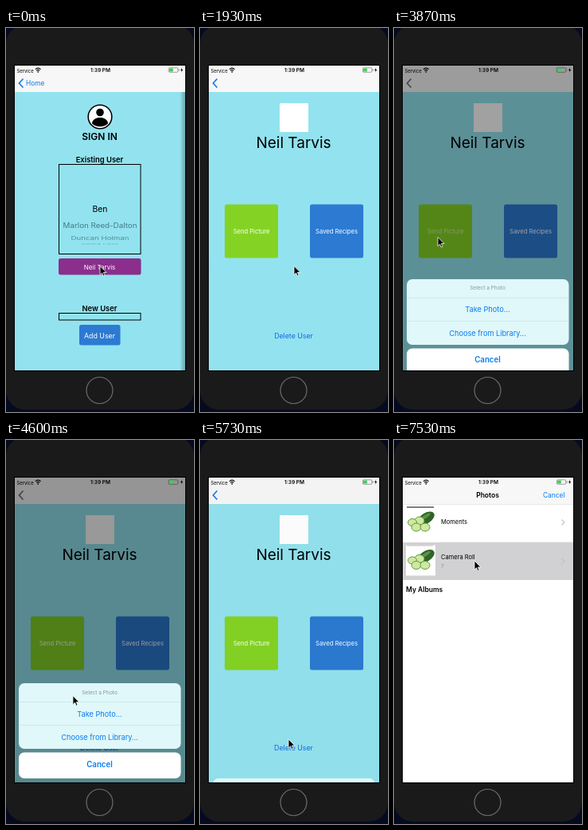
An HTML page that plays this animation: 236x480 px, repeating every 8000 ms.

```html
<!DOCTYPE html>
<html lang="en">
<head>
<meta charset="utf-8">
<title>Phone app demo</title>
<style>
  html, body { margin: 0; width: 100%; height: 100%; overflow: hidden; background: #060a20; }
  svg { display: block; width: 236px; height: 480px; }
  text { font: 400 8.4px Inter, "Liberation Sans", sans-serif; text-anchor: middle; dominant-baseline: central; }
  .left { text-anchor: start; }
  .bold { font-weight: 600; }
  .white { fill: #fff; }
  .link { fill: #087bf0; }
  .title { font-size: 19px; }
  .label { font-size: 7.6px; }
  .row { font-size: 7.5px; }
  .action { font-size: 9.2px; }
  .line { fill: none; stroke: #000; }
</style>
</head>
<body>
<svg viewBox="0 0 236 480">
  <defs>
    <clipPath id="screen"><rect x="11" y="47" width="214" height="381"/></clipPath>
    <linearGradient id="shade"><stop offset="0" stop-opacity="0"/><stop offset="1" stop-opacity=".28"/></linearGradient>
    <g id="veg">
      <rect width="37" height="38" fill="#fff"/>
      <ellipse cx="25" cy="14" rx="12" ry="6.5" fill="#2f6426" transform="rotate(-32 25 14)"/>
      <ellipse cx="24" cy="12" rx="8" ry="2" fill="#5c9148" transform="rotate(-32 24 12)"/>
      <g fill="#cfe8a2" stroke="#5f9c38">
        <ellipse cx="17" cy="17" rx="6" ry="5"/>
        <ellipse cx="8" cy="19" rx="5.5" ry="4.5"/>
        <ellipse cx="13" cy="25" rx="6" ry="5"/>
        <ellipse cx="24" cy="25" rx="6" ry="5"/>
      </g>
    </g>
    <path id="next" d="M210.500-3.500l3.500 3.500l-3.500 3.500" fill="none" stroke="#c2c2c6" stroke-width="1.100"/>
  </defs>

  <rect y="-4" width="236" height="481" rx="24" fill="#1a1a1a"/>
  <rect x="10.500" y="46.500" width="215" height="382" class="line"/>
  <circle cx="117.500" cy="453" r="16.500" fill="none" stroke="#6c6c6c" stroke-width="1.200"/>

  <g clip-path="url(#screen)">
    <g id="signIn">
      <rect x="11" y="80" width="214" height="348" fill="#92e3ef"/>
      <circle cx="118" cy="111" r="14.800" fill="#fff" stroke="#000" stroke-width="1.600"/>
      <circle cx="118" cy="105.500" r="4.800"/>
      <path d="M108 119.500c0-10 20-10 20 0c-5 5-15 5-20 0z"/>
      <text x="117.500" y="135" class="bold" style="font-size:12px">SIGN IN</text>
      <text x="117.500" y="164" class="bold" style="font-size:9.400px">Existing User</text>
      <rect x="66.500" y="170.500" width="102.500" height="112" class="line"/>
      <text x="118" y="226.500" style="font-size:10.400px">Ben</text>
      <g fill="#38707a" style="font-size:9.800px">
        <text transform="translate(118 246.500) scale(1 .88)" style="font-size:9.800px" opacity=".9">Marlon Reed-Dalton</text>
        <text transform="translate(118 262.500) scale(1 .6)" style="font-size:9.700px" opacity=".75">Duncan Holman</text>
        <text transform="translate(118 270.500) scale(1 .25)" style="font-size:9.400px" opacity=".4">Petra Lind</text>
      </g>
      <rect x="66" y="288" width="103.500" height="20.500" rx="2.500" fill="#8b2e8c"/>
      <text id="userTitle" x="117.500" y="298.500" class="white" style="font-size:8px">Neil Tarvis</text>
      <text x="117.500" y="350" class="bold" style="font-size:9.400px">New User</text>
      <rect x="66.500" y="356.500" width="102.500" height="8.500" class="line"/>
      <rect x="92" y="371" width="51.500" height="25.500" rx="2.500" fill="#2c7ad2"/>
      <text x="117.500" y="384" class="white" style="font-size:8.800px">Add User</text>
    </g>
    <rect id="under" x="11" y="80" width="214" height="348"/>

    <g id="home">
      <rect x="4" y="80" width="7" height="348" fill="url(#shade)"/>
      <rect x="11" y="80" width="214" height="348" fill="#92e3ef"/>
      <rect x="100" y="94" width="36" height="36" fill="#fff"/>
      <text x="117.500" y="143.500" class="title">Neil Tarvis</text>
      <rect x="31" y="220.500" width="67" height="67" rx="2.500" fill="#84d324"/>
      <text id="sendTitle" x="64.500" y="254" class="white label">Send Picture</text>
      <rect x="138" y="220.500" width="67" height="67" rx="2.500" fill="#2c7ad2"/>
      <text x="171.500" y="254" class="white label">Saved Recipes</text>
      <text x="117.500" y="384.500" fill="#1569e0" style="font-size:8.800px">Delete User</text>
    </g>

    <rect x="11" y="47" width="214" height="33" fill="#f7f7f7"/>
    <path id="back" d="M21.500 63.500l-5 5.500l5 5.500" fill="none" stroke="#167df0" stroke-width="1.700"/>
    <text id="backText" x="25" y="69" class="left link">Home</text>

    <rect id="dim" x="11" y="47" width="214" height="381"/>

    <g id="sheet">
      <rect x="16" y="304" width="203.500" height="82" rx="7" fill="#e0f8fa"/>
      <rect id="picked" x="16" y="356.500" width="203.500" height="29.500" rx="5" fill="#c4dfe3"/>
      <path d="M16 327.500h203.500M16 356.500h203.500" stroke="#bfdfe3" stroke-width=".6"/>
      <text x="117.500" y="315.500" fill="#87959a" style="font-size:6.550px">Select a Photo</text>
      <text x="117.500" y="342" class="link action">Take Photo…</text>
      <text x="117.500" y="371.500" class="link action">Choose from Library…</text>
      <rect x="16" y="390.500" width="203.500" height="32.500" rx="7" fill="#fff"/>
      <text x="117.500" y="405" class="link bold" style="font-size:9.700px">Cancel</text>
    </g>

    <g id="photos">
      <rect x="11" y="47" width="214" height="381" fill="#fff"/>
      <rect x="11" y="47" width="214" height="33" fill="#f7f7f7"/>
      <path d="M11 80.500h214" stroke="#d8d8da" stroke-width=".6"/>
      <text x="117.500" y="69" class="bold" style="font-size:8.500px">Photos</text>
      <text id="cancel" x="200.700" y="69" class="link">Cancel</text>
      <use href="#veg" x="15" y="84"/>
      <path d="M16 84h34" stroke="#55555c" stroke-width="1.500"/>
      <text x="59" y="102.500" class="left row">Moments</text>
      <use href="#next" y="103"/>
      <path d="M59 127.500h166" stroke="#e2e2e4" stroke-width=".6"/>
      <rect id="pressed" x="11" y="128" width="214" height="47" fill="#d1d0d2"/>
      <use href="#veg" x="15" y="131.500"/>
      <path d="M16 132h33" stroke="#aaa" stroke-width=".7"/>
      <text x="59" y="146.500" class="left row">Camera Roll</text>
      <text x="59" y="157.500" class="left" fill="#8d8d90" style="font-size:6.500px">7</text>
      <use href="#next" y="151.500"/>
      <text x="15" y="187" class="left bold" style="font-size:8.500px">My Albums</text>
    </g>

    <text x="13.500" y="53" class="left" style="font-size:5.900px">Service</text>
    <g class="line" stroke-width="1.200">
      <path d="M36.800 51.600q3.400-2.800 6.800 0M38.300 53.200q1.900-1.500 3.800 0"/>
    </g>
    <circle cx="40.200" cy="54.800" r=".9"/>
    <text x="118.500" y="53" class="bold" style="font-size:6.500px">1:39 PM</text>
    <rect x="204.300" y="49.800" width="11.500" height="5.500" rx="1.300" class="line" stroke-width=".6" opacity=".6"/>
    <rect x="205" y="50.500" width="4.800" height="4.100" rx=".5" fill="#3fcf5c"/>
    <path d="M217 51.500v2" stroke="#777"/>
    <path d="M221.300 49.500l-2.300 3.400h1.500l-.6 2.600l2.300-3.400h-1.500z"/>
  </g>
  <path id="cursor" d="M0 0V11L2.600 8.700L4.200 12.500L6 11.700L4.400 8H8Z" stroke="#fff" stroke-width=".8"/>
</svg>
<script>
const LOOP = 8000;
const el = id => document.getElementById(id);
const clamp = v => Math.min(1, Math.max(0, v));
const ramp = (t, a, b) => clamp((t - a) / (b - a));
const ease = v => v * v * (3 - 2 * v);
const within = (t, a, b) => t >= a && t < b;

// Critically damped spring, 0 to 1
function settle(t, start, rate = 17) {
  const x = Math.max(0, t - start) / 1000 * rate;
  return 1 - (1 + x) * Math.exp(-x);
}

const moves = [
  [2040, 2670, 55, 261.5],
  [4100, 5080, 111, 374],
  [6400, 7270, 101, 151],
];

function cursorAt(t) {
  let x = 118, y = 297.5;
  for (const [a, b, toX, toY] of moves) {
    const p = ease(ramp(t, a, b));
    x += (toX - x) * p;
    y += (toY - y) * p;
  }
  return [x, y];
}

const move = (id, x, y) => el(id).setAttribute("transform", `translate(${x} ${y})`);
const fade = (id, v) => el(id).setAttribute("opacity", v);
const press = (t, down, up) => 1 - .7 * (ramp(t, down, down + 70) - ramp(t, up, up + 450));

function draw(t) {
  const push = settle(t, 1048, 13);
  const sheet = settle(t, 3626) - settle(t, 5435);
  const photos = settle(t, 6142);

  move("signIn", -64 * push, 0);
  fade("under", .25 * push);
  move("home", 214 * (1 - push), 0);
  fade("backText", clamp(1 - push * 1.06));
  fade("userTitle", press(t, 860, 1070));
  fade("sendTitle", press(t, 3400, 3670));

  fade("dim", .4 * sheet);
  el("back").style.filter = `grayscale(${clamp(sheet)})`;
  move("sheet", 0, 124 * (1 - sheet));
  fade("picked", within(t, 5320, 5450) ? 1 : 0);

  move("photos", 0, 381 * (1 - photos));
  fade("cancel", clamp(photos * 1.4 - .4));
  fade("pressed", t >= 7530 ? 1 : 0);

  move("cursor", ...cursorAt(t));
}

function tick() {
  draw(performance.now() % LOOP);
  requestAnimationFrame(tick);
}
tick();
</script>
</body>
</html>
```
